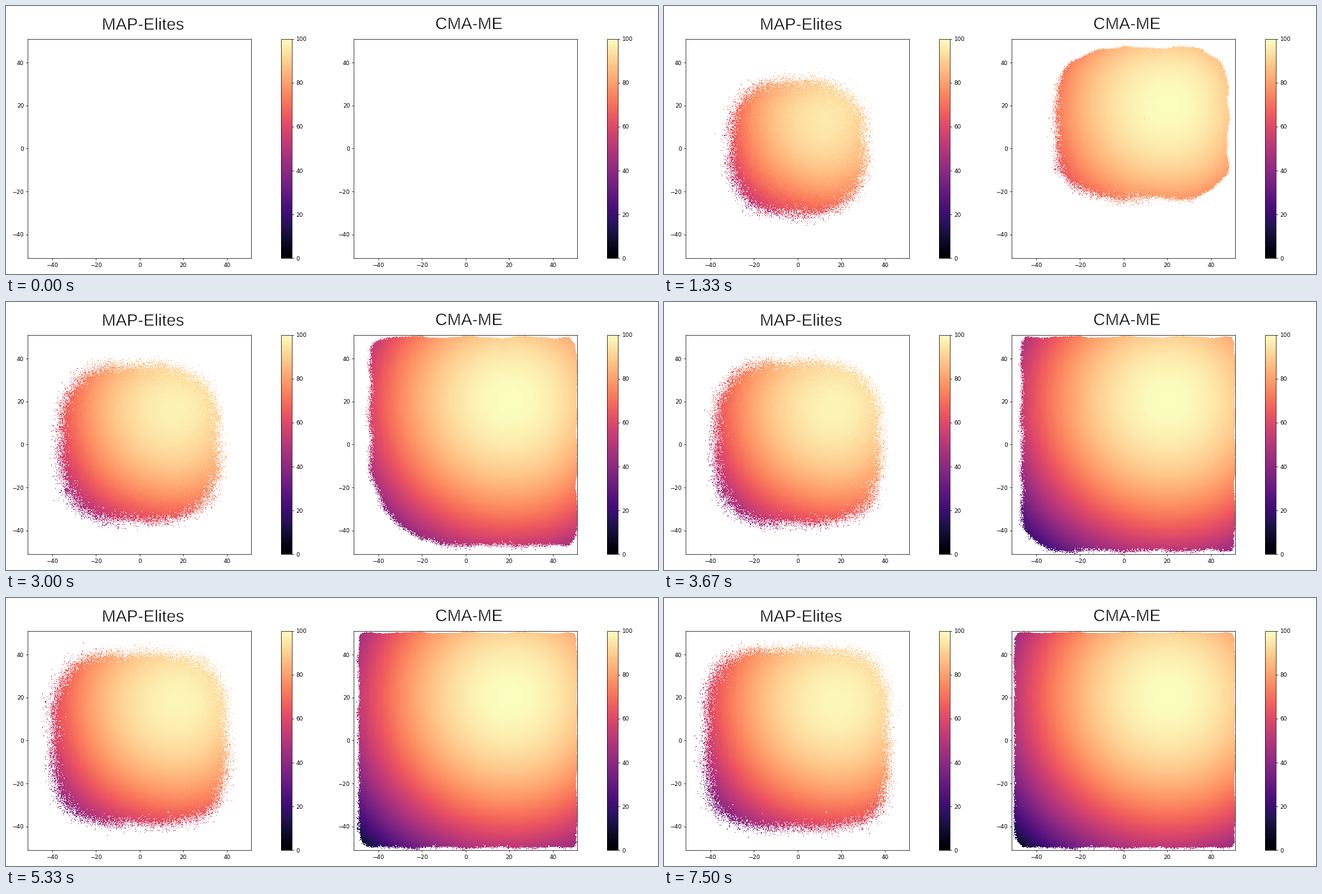
Animation, 1024 px wide and 422 px high, one loop 7.67 s. Source, as a matplotlib script:

```python
import numpy as np
import matplotlib.pyplot as plt
from matplotlib import patheffects
from matplotlib.animation import FuncAnimation

W, H, DPI = 1024, 422, 64
FRAMES, LOOP_MS = 46, 7670
LIMIT, CELLS = 51.2, 320
START = 12  # half size of the first patch of solutions
PEAK = 0.4 * LIMIT

axis = (np.arange(CELLS) + 0.5) / CELLS * 2 * LIMIT - LIMIT
X, Y = np.meshgrid(axis, axis)
SPHERE = 100 * (1 - ((X - PEAK) ** 2 + (Y - PEAK) ** 2) / (2 * (LIMIT + PEAK) ** 2))
# The lower left front, far from the peak, is the most ragged.
ROUGH = np.clip((30 - X - Y) / 50, 0.2, 1)


def wobble(a, b):
    return (np.sin(0.24 * X + a) + np.sin(0.27 * Y + b)
            + 0.6 * np.sin(0.55 * X - 0.2 * Y + b)
            + 0.6 * np.sin(0.5 * Y + 0.25 * X + a)) / 2


ELITES_WAVE, CMA_WAVE = wobble(2.6, 0.4), wobble(4.4, 1.2)


def grow(step, end, tau, power=1):
    return START + (end - START) * (1 - np.exp(-(step / tau) ** power))


def rounded_box(left, right, bottom, top, ul, ur, lr, ll):
    """Signed distance to a box with its own radius at each corner."""
    px, py = X - (left + right) / 2, Y - (bottom + top) / 2
    hx, hy = (right - left) / 2, (top - bottom) / 2
    r = np.where(py > 0, np.where(px > 0, ur, ul), np.where(px > 0, lr, ll))
    r = np.minimum(r, min(hx, hy))
    qx, qy = np.abs(px) - hx + r, np.abs(py) - hy + r
    outside = np.hypot(np.maximum(qx, 0), np.maximum(qy, 0))
    return np.minimum(np.maximum(qx, qy), 0) + outside - r


def elites_state(step):
    """A superellipse that widens with the log of time."""
    size = 19.7 + 5.8 * np.log(step)
    p = 2.5 + 0.03 * step
    dist = (np.abs(X) ** p + np.abs(Y - 0.5) ** p) ** (1 / p) - size
    dist = dist + 0.5 * ELITES_WAVE
    loss = (4 + 8 * np.exp(-step / 12)) * (0.1 + np.exp(dist / 12))
    return dist, 1.9, loss


def cma_state(step):
    """A box that reaches the top and right first, then the other sides."""
    cut = np.exp(-(step / 14) ** 3)
    low_cut = np.exp(-((step - 13.5) / 7) ** 2)
    dist = rounded_box(
        -grow(step, 50, 10, 1.1), grow(step, 50.9, 2.7),
        -grow(step, 50, 10.9, 2.25), grow(step, 50.2, 2.7),
        3 + 26 * cut, 3 + 18 * cut, 3 + 18 * cut, 7 + 42 * low_cut)
    dist = dist + 1.2 * np.exp(-step / 25) * CMA_WAVE
    spread = ROUGH * (0.2 + 2.2 * np.exp(-step / 13))
    loss = (0.3 + 5 * np.exp(-step / 13)) * np.exp(dist / 7)
    return dist, spread, loss


def run(state, seed):
    """Archive contents at every step; a filled cell stays filled."""
    rng = np.random.default_rng(seed)
    reach = rng.normal(size=X.shape)
    flaw = np.abs(rng.normal(size=X.shape))
    speck = 10 * (rng.random(X.shape) < 0.0006)
    filled = np.zeros(X.shape, bool)
    steps = [np.full(X.shape, np.nan)]
    for step in range(1, FRAMES):
        dist, spread, loss = state(step)
        filled |= dist < spread * reach
        value = SPHERE - loss * (0.75 + 0.3 * flaw) - speck * np.exp(-step / 15)
        steps.append(np.where(filled, np.clip(value, 0, 100), np.nan))
    return steps


fig = plt.figure(figsize=(W / DPI, H / DPI), dpi=DPI, facecolor="white")


def add_axes(x0, x1, y0=51.7, y1=397.3):
    return fig.add_axes([x0 / W, 1 - y1 / H, (x1 - x0) / W, (y1 - y0) / H])


def panel(x, title, baseline):
    ax = add_axes(x + 34.4, x + 385.2)
    image = ax.imshow(np.full(X.shape, np.nan), cmap="magma", vmin=0, vmax=100,
                      origin="lower", extent=[-LIMIT, LIMIT, -LIMIT, LIMIT],
                      aspect="auto", interpolation="nearest")
    ticks = range(-40, 41, 20)
    ax.set_xticks(ticks)
    ax.set_yticks(ticks)
    fig.colorbar(image, cax=add_axes(x + 432.2, x + 449.3), ticks=range(0, 101, 20))
    # A white outline thins the letters to a light weight.
    fig.text((x + 215) / W, 1 - baseline / H, title, ha="center", va="baseline",
             family="Liberation Sans", size=29.4, color="black",
             path_effects=[patheffects.Stroke(linewidth=0.6, foreground="white")])
    return image


images = [panel(0, "MAP-Elites", 37.3), panel(512, "CMA-ME", 36.3)]
archives = [run(elites_state, 5), run(cma_state, 11)]


def update(step):
    for image, steps in zip(images, archives):
        image.set_data(steps[step])
    return images


anim = FuncAnimation(fig, update, frames=FRAMES, interval=LOOP_MS / FRAMES,
                     repeat=True, repeat_delay=0, blit=False)
plt.show()
```
